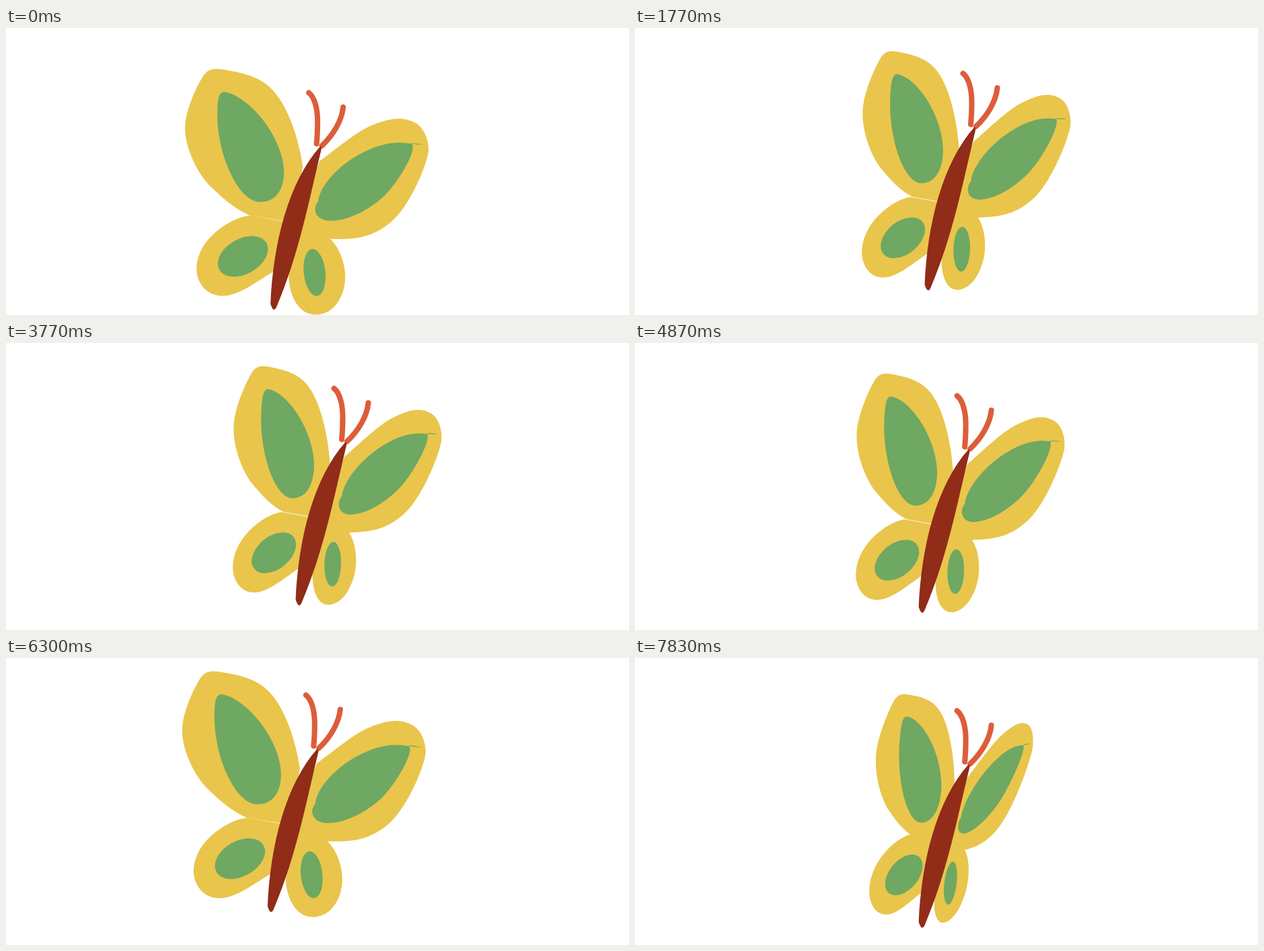
Write an HTML page with a canvas that moves like this. It is 926x428 px and loops after 7910 ms.

```html
<!DOCTYPE html>
<html lang="en">
<head>
<meta charset="utf-8">
<title>Butterfly</title>
<style>
html, body { margin: 0; width: 100%; height: 100%; overflow: hidden; background: #fff; }
canvas { display: block; }
</style>
</head>
<body>
<canvas id="stage" width="926" height="428"></canvas>
<script>
const ctx = document.getElementById('stage').getContext('2d');
const YELLOW = '#e9c54b', GREEN = '#6fa862', BROWN = '#912c18', CORAL = '#dd5d3a';
const LOOP = 7910;
const HEAD = [468, 177], TILT = 0.281;

// width and lean: how the wing narrows and shears for the folds open, half, shut.
const wing = (edge, spot, width, lean) => ({ edge: new Path2D(edge), spot: new Path2D(spot), width, lean });

const wings = [
  wing('M441 207C434 160 418 118 398 95S350 67 320 62C306 60 299 63 293 72S266 120 266 150' +
       'S285 219 305 238S340 270 362 280L425 290Z',
       'M326 96C364 104 412 165 413 215C413 245 398 260 378 260C345 260 314 190 314 130C314 105 316 95 326 96Z',
       [1, 0.83, 0.68], [0, 0.035, 0.03]),
  wing('M362 280C341 283 322 295 307 309S283 342 283 360S296 399 320 400S370 380 397 364L420 290Z',
       'M317 361A40 26 -30 1 1 387 321A40 26 -30 1 1 317 361Z',
       [1, 0.87, 0.72], [0, 0.02, 0.07]),
  wing('M466 199C490 182 520 155 545 145S590 131 610 143C621 150 628 166 628 182S602 265 572 290' +
       'S515 316 482 315L430 315L452 235Z',
       'M603 173C612 182 582 232 562 251S510 288 482 288C460 288 454 270 464 259C468 220 540 165 594 172S601 170 603 173Z',
       [1, 0.87, 0.54], [0, -0.03, -0.07]),
  wing('M482 315C495 328 504 350 504 372C504 398 489 428 460 428C435 428 421 400 420 372L430 300Z',
       'M455 330A16 35 -6 1 1 462 400A16 35 -6 1 1 455 330Z',
       [1, 0.73, 0.52], [0, -0.065, -0.13])
];
const body = new Path2D('M467 177C420 230 397 320 393 412Q398 428 403 414C436 335 450 258 468 184Q470 177 467 177Z');
const feelers = new Path2D('M450 97C459 104 463 122 463 140Q463 158 461.500 173M501 118.500C499 139 486 160 469.500 176');

function fill(path, color) {
  ctx.fillStyle = color;
  ctx.fill(path);
}

// Paint one part of every wing, squeezed towards the body axis.
function paintWings(part, color, fold) {
  for (const w of wings) {
    ctx.save();
    ctx.translate(HEAD[0], HEAD[1]);
    ctx.rotate(TILT);
    ctx.transform(w.width[fold], w.lean[fold], 0, 1, 0, 0);
    ctx.rotate(-TILT);
    ctx.translate(-HEAD[0], -HEAD[1]);
    fill(w[part], color);
    ctx.restore();
  }
}

function draw(step) {
  const fold = [0, 1, 2, 1][step % 4];
  // A lopsided loop, once every nine drawings.
  const a = step * 2 * Math.PI / 9;
  const dx = 10.9 + 20.3 * Math.cos(a + 1.97) + 6.5 * Math.cos(2 * a - 2.03);
  const dy = -28.3 + 25.4 * Math.cos(a + 0.525) + 6.3 * Math.cos(2 * a - 0.365);

  ctx.setTransform(1, 0, 0, 1, 0, 0);
  ctx.clearRect(0, 0, 926, 428);
  ctx.translate(dx, dy);
  paintWings('edge', YELLOW, fold);
  paintWings('spot', GREEN, fold);
  ctx.strokeStyle = CORAL;
  ctx.lineWidth = 8;
  ctx.lineCap = 'round';
  ctx.stroke(feelers);
  fill(body, BROWN);
}

// Drawings last 110 ms, rounded up to thirtieths of a second; the fifth of 36 is held twice.
function tick() {
  const t = performance.now() % LOOP;
  const thirtieth = Math.floor((t + 3.4) * 0.03);
  const n = Math.floor(thirtieth * 10 / 33) % 36;
  draw(n > 4 ? n - 1 : n);
  requestAnimationFrame(tick);
}
tick();
</script>
</body>
</html>
```
